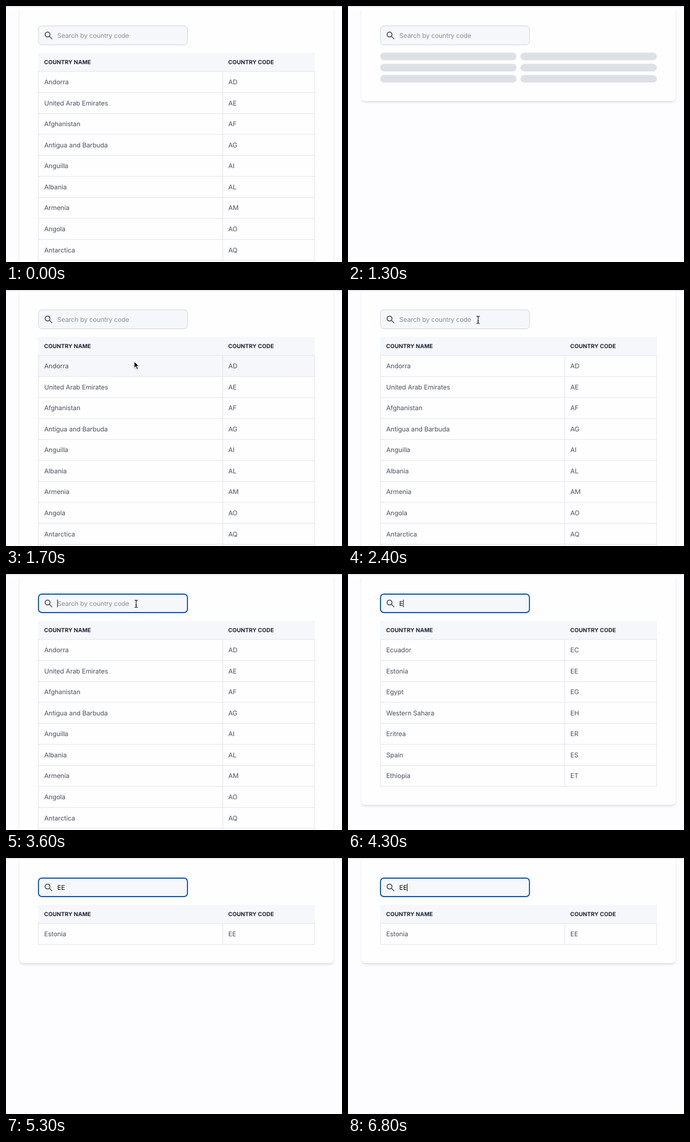
Recreate the animation shown at these times as an HTML page. Size 600x458 px, loop 7100 ms.

```html
<!DOCTYPE html>
<html lang="en">
<head>
<meta charset="utf-8">
<style>
html, body { margin: 0; width: 100%; height: 100%; overflow: hidden; background: #fdfcff; }
main { position: relative; width: 100%; height: 100%; overflow: hidden; contain: strict; }
#card {
  position: absolute; left: 24px; top: 0; width: 561px; border-radius: 7px; background: #fefdff;
  box-shadow: 0 3.3px 5px -.8px rgba(0,0,0,.1), 0 1.7px 3.3px -.8px rgba(0,0,0,.06);
}
svg { position: absolute; left: 0; top: 0; width: 100%; height: 100%; }
text { font: 11.6px Inter, sans-serif; letter-spacing: -.08px; fill: #4d535f; text-rendering: geometricPrecision; }
.head { font-size: 10px; font-weight: 700; letter-spacing: .04px; fill: #20263a; }
.hint { letter-spacing: -.13px; fill: #8b909b; }
.typed { fill: #050608; }
</style>
</head>
<body>
<main>
<div id="card"></div>
<svg viewBox="0 0 600 458"></svg>
</main>
<script>
const LOOP = 7100, LEFT = 57.5, RIGHT = 551.5, SPLIT = 387, TOP = 117, ROW = 37.54;
const ALL = [
  ['Andorra', 'AD'], ['United Arab Emirates', 'AE'], ['Afghanistan', 'AF'],
  ['Antigua and Barbuda', 'AG'], ['Anguilla', 'AI'], ['Albania', 'AL'],
  ['Armenia', 'AM'], ['Angola', 'AO'], ['Antarctica', 'AQ'], ['Argentina', 'AR']
];
const WITH_E = [
  ['Ecuador', 'EC'], ['Estonia', 'EE'], ['Egypt', 'EG'], ['Western Sahara', 'EH'],
  ['Eritrea', 'ER'], ['Spain', 'ES'], ['Ethiopia', 'ET']
];
const svg = document.querySelector('svg');
const card = document.getElementById('card');

const rect = (x, y, w, h, fill, more = '') =>
  `<rect x="${x}" y="${y}" width="${w}" height="${h}" fill="${fill}" ${more}/>`;
const text = (x, y, s, cls = '') => `<text x="${x}" y="${y}" class="${cls}">${s}</text>`;
const path = (d, more) => `<path d="${d}" ${more}/>`;

function skeleton() {
  let out = '';
  for (const y of [83.5, 103.5, 123.5])
    for (const x of [LEFT, 308]) out += rect(x, y, 243.5, 13.4, '#dde1e6', 'rx="6.7"');
  return out;
}

function table(rows, hover) {
  const bottom = TOP + rows.length * ROW;
  let out = rect(LEFT, 84, RIGHT - LEFT, 33, '#f5f7fa') +
    text(68, 104, 'COUNTRY NAME', 'head') + text(396.8, 104, 'COUNTRY CODE', 'head');
  if (hover) out += rect(LEFT, TOP, RIGHT - LEFT, ROW, '#f5f7fa');
  let lines = '';
  for (let i = 0; i <= rows.length; i++) lines += `M${LEFT} ${TOP + i * ROW + .2}H${RIGHT}`;
  for (const x of [LEFT + .4, SPLIT, RIGHT - .4]) lines += `M${x} ${TOP}V${bottom}`;
  out += path(lines, 'stroke="#dfe2e7" stroke-width=".9"');
  rows.forEach(([name, code], i) => {
    const y = TOP + i * ROW + 23.2;
    out += text(68.2, y, name) + text(397, y, code);
  });
  return out;
}

function field(focus, typed) {
  const box = focus
    ? rect(58, 36, 266, 33, '#f5f7fa', 'rx="6" stroke="#0c56ab" stroke-width="1.9"')
    : rect(57.9, 35.5, 266.3, 34, '#f5f7fa', 'rx="6.5" stroke="#cfd4da"');
  return box +
    `<g transform="translate(66.6 43.4) scale(.8)" fill="none" stroke="#555963" stroke-width="2.1">
      <circle cx="9.5" cy="9.5" r="5.5"/><path d="M13.6 13.6L19.8 19.8"/></g>` +
    (typed ? text(91.6, 56.7, typed, 'typed') : text(91.6, 56.7, 'Search by country code', 'hint'));
}

function pointer(x, y) {
  if (y < 70) {
    const d = `M${x - 2.8} ${y - 6.4}q2.8 0 2.8 1.8v9.2q0 1.8-2.8 1.8m5.6 0q-2.8 0-2.8-1.8v-9.2q0-1.8 2.8-1.8M${x - 1.5} ${y + 2}h3`;
    return path(d, 'fill="none" stroke="#fff" stroke-width="2.2"') +
      path(d, 'fill="none" stroke="#111" stroke-width="1.1"');
  }
  return path(`M${x} ${y}v11.2l2.6-2.4 2.1 4.8 2-.9-2.1-4.6h3.5z`,
    'fill="#000" stroke="#fff" stroke-width=".9" style="filter:drop-shadow(0 1px 1px rgba(0,0,0,.3))"');
}

function caretOn(t) {
  if (t < 2600) return false;
  if (t < 4200) return (t - 2600) % 1000 < 500;
  return t < 4800 || (t - 4800) % 1000 < 500;
}

function draw(t) {
  const typed = t < 4200 ? '' : t < 4800 ? 'E' : 'EE';
  const loading = t >= 1300 && t < 1600 || t >= 4200 && t < 4300;
  const rows = !typed ? ALL : WITH_E.filter(r => r[1].startsWith(typed));

  // The pointer bows left on its way up to the field.
  const k = Math.min(1, Math.max(0, (t - 1800) / 600));
  const e = k * k * (3 - 2 * k);
  const px = 229 + 3.4 * e - 6 * Math.sin(Math.PI * e);
  const py = 128 - 74.7 * e;
  const shown = t >= 1700 && t < 4200;

  card.style.height = (loading ? 170.3 : TOP + rows.length * ROW + 33.7) + 'px';
  svg.innerHTML = rect(0, .6, 600, 1.2, '#dcdbe0') + field(t >= 2600, typed) +
    (loading ? skeleton() : table(rows, shown && py > TOP)) +
    (shown ? pointer(px, py) : '');
  if (caretOn(t)) {
    const width = typed ? svg.querySelector('.typed').getComputedTextLength() : 0;
    svg.insertAdjacentHTML('beforeend', rect(91.5 + width, 45.8, 1, 13.8, '#050608'));
  }
}

let last = -1;
const start = performance.now();
function tick() {
  const t = Math.floor((performance.now() - start) % LOOP / 100) * 100;
  if (t !== last) draw(last = t);
  requestAnimationFrame(tick);
}
tick();
</script>
</body>
</html>
```
